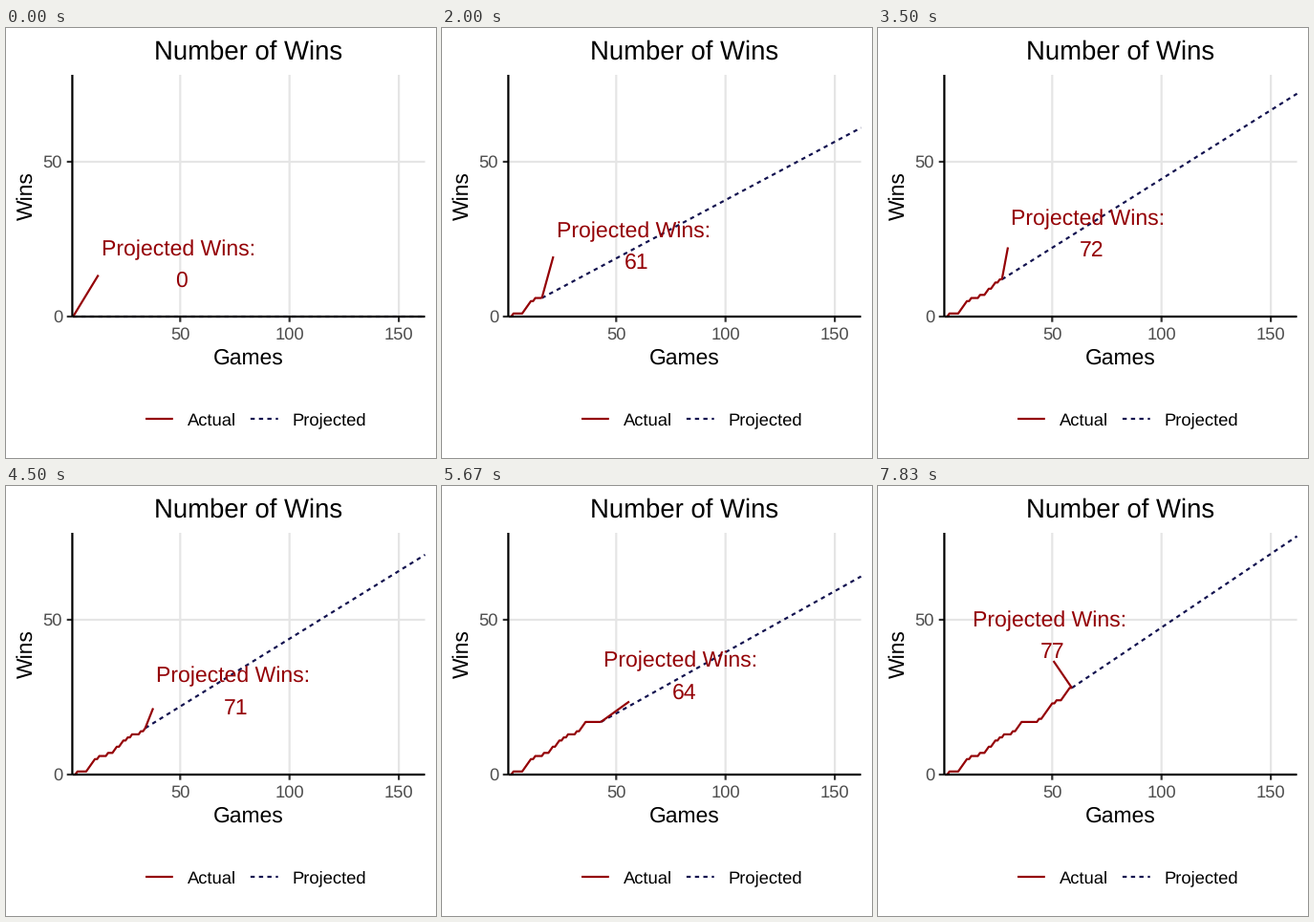
A matplotlib script for the animation above (8 s loop, 450 by 450 pixels).

```python
import matplotlib.pyplot as plt
import numpy as np
from matplotlib.animation import FuncAnimation

SIZE, DPI = 450, 100
STEPS, LOOP_MS, TICK_MS = 48, 8000, 25
LEAD_MS = 17                    # steps begin on the tick just before they are due
SEASON = 162
RED, NAVY = "#940005", "#12124F"
GRID, TICK, TICK_TEXT = "#E5E5E5", "#333333", "#4D4D4D"
LINE = 2.2                      # stroke width in pixels
LEFT, RIGHT, TOP, BOTTOM = 69.4, 438.5, 49, 302

# One digit per game: 1 is a win
RESULTS = ("0010000111" "1010001001" "1011010100"
           "0101110000" "0001011111" "010011110")
WINS = np.cumsum([int(c) for c in RESULTS])

# Label centre relative to the latest point, and leader tip relative to the label
KEYS = [0, 12, 21, 27, 31, 34]
LABEL_DX = [110, 96, 90.3, 91.8, 90, 83.7]
LABEL_DY = [-55.5, -55.5, -48.6, -39.4, -19, -48.9]
TIP_DX = [-83.5, -84, -84, -83.5, -83.5, -54]
TIP_DY = [12, 12, 15, 18.5, 14, 27.5]
SWITCH = 38                     # the label jumps to the left side here

plt.rcParams["font.family"] = "Liberation Sans"
plt.rcParams["text.hinting"] = "none"
plt.rcParams["text.hinting_factor"] = 8
plt.rcParams["path.snap"] = False


def pt(px):
    return px * 72 / DPI


def game_x(game):
    return 182.3 + (game - 50) * 2.288


def win_y(wins):
    return BOTTOM - wins * 3.24


fig = plt.figure(figsize=(SIZE / DPI, SIZE / DPI), dpi=DPI, facecolor="white")
ax = fig.add_axes([0, 0, 1, 1])
ax.set_xlim(0, SIZE)
ax.set_ylim(SIZE, 0)
ax.axis("off")


def stroke(xs, ys, color, z, **kw):
    kw.setdefault("solid_capstyle", "butt")
    return ax.plot(xs, ys, color=color, lw=pt(LINE), zorder=z, **kw)[0]


def write(x, y, text, px, color="black", ha="center", **kw):
    return ax.text(x, y, text, fontsize=pt(px), color=color, ha=ha,
                   va="baseline", zorder=6, **kw)


# Grid, ticks and axes
for game in (50, 100, 150):
    x = game_x(game)
    stroke([x, x], [TOP, BOTTOM], GRID, 1)
    stroke([x, x], [BOTTOM, BOTTOM + 5.7], TICK, 4)
    write(x, 325.8, str(game), 18.33, TICK_TEXT)
for wins in (0, 50):
    y = win_y(wins)
    stroke([LEFT, RIGHT], [y, y], GRID, 1)
    stroke([LEFT - 5.7, LEFT], [y, y], TICK, 4)
    write(59, y + 5.9, str(wins), 18.33, TICK_TEXT, "right")
stroke([LEFT, LEFT], [TOP, BOTTOM], "black", 5)
stroke([LEFT, RIGHT], [BOTTOM, BOTTOM], "black", 5)

# Titles and legend
MID = (LEFT + RIGHT) / 2
write(MID, 32.3, "Number of Wins", 27.5)
write(MID, 352, "Games", 22.92)
write(27.5, (TOP + BOTTOM) / 2, "Wins", 22.92, rotation=90,
      rotation_mode="anchor")
DASH = dict(ls=(0, (2, 2)), dash_capstyle="butt")
stroke([146, 174.8], [409, 409], RED, 4)
stroke([255.9, 284.7], [409, 409], NAVY, 4, **DASH)
write(189.9, 415.7, "Actual", 18.33, ha="left")
write(299.5, 415.7, "Projected", 18.33, ha="left")

# Moving parts
actual = stroke([], [], RED, 2, solid_joinstyle="round")
projected = stroke([], [], NAVY, 3, **DASH)
leader = stroke([], [], RED, 3)
caption = write(0, 0, "Projected Wins:", 23, RED)
count = write(0, 0, "", 23, RED)


def label_layout(step, px, py):
    if step >= SWITCH:
        return 179.3, py - 55.7, 4.3, 27.5
    dx, dy, tx, ty = (np.interp(step, KEYS, track)
                      for track in (LABEL_DX, LABEL_DY, TIP_DX, TIP_DY))
    return px + dx, py + dy, tx, ty


def draw(frame):
    step = int((frame * TICK_MS + LEAD_MS) * STEPS / LOOP_MS)
    game = round(1.165 + 1.2285 * step)
    wins = WINS[game - 1]
    total = round(wins * SEASON / game)
    px, py = game_x(game), win_y(wins)

    actual.set_data(game_x(np.arange(1, game + 1)), win_y(WINS[:game]))
    projected.set_data([px, game_x(SEASON)], [py, win_y(total)])

    cx, cy, tx, ty = label_layout(step, px, py)
    leader.set_data([px, cx + tx], [py, cy + ty])
    caption.set_position((cx, cy - 8.3))
    count.set_position((cx + 3.3, cy + 24.7))
    count.set_text(str(total))
    return actual, projected, leader, caption, count


anim = FuncAnimation(fig, draw, frames=LOOP_MS // TICK_MS, interval=TICK_MS,
                     init_func=lambda: draw(0), repeat=True, repeat_delay=0,
                     blit=False)
plt.show()
```
